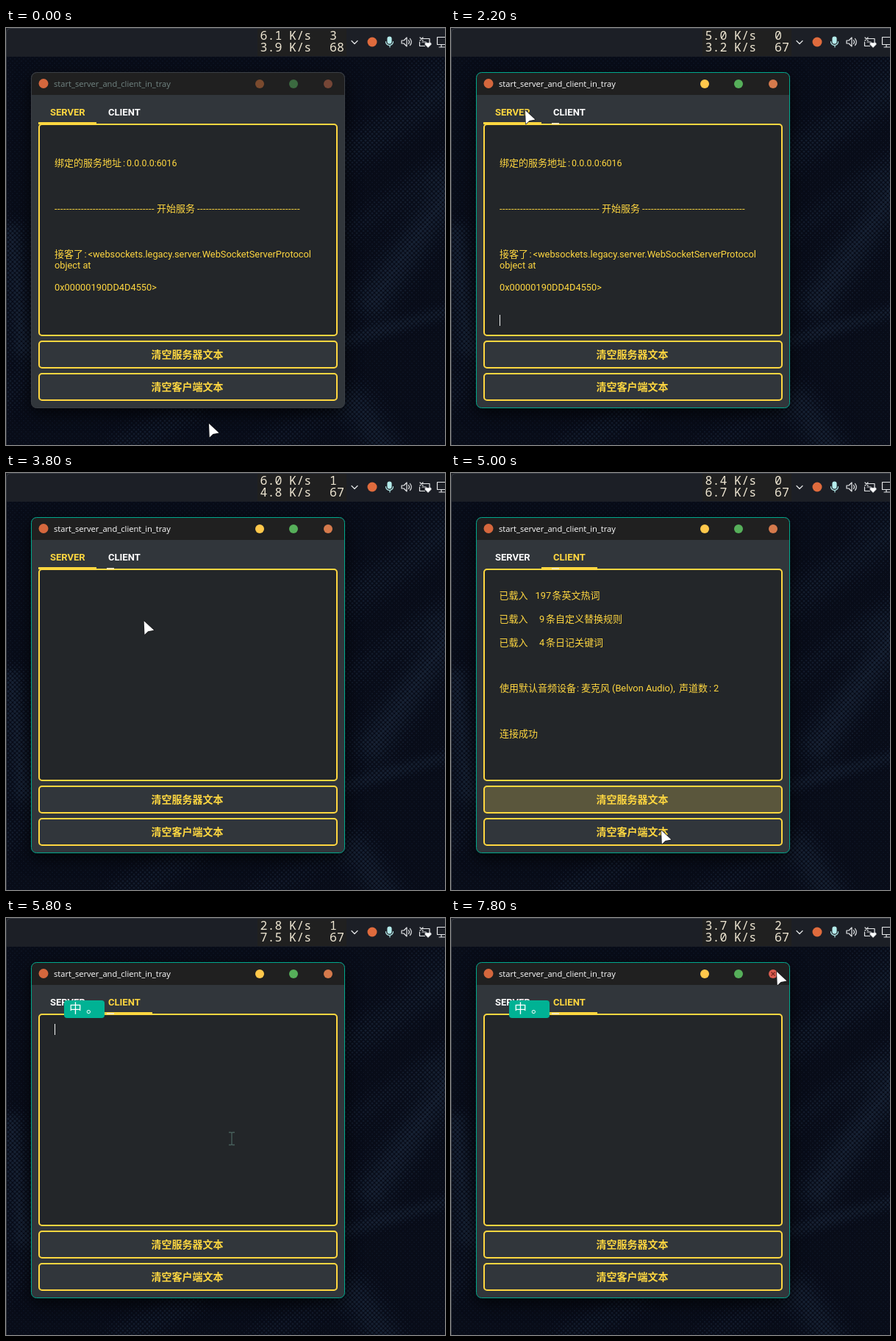
Write an HTML page with a canvas that moves like this. It is 597 px wide and 567 px high and loops after 8 s.

```html
<!DOCTYPE html>
<html lang="zh">
<head>
<meta charset="utf-8">
<style>
  html, body { margin: 0; width: 100%; height: 100%; overflow: hidden; background: #080c18; }
  canvas, svg { position: absolute; left: 0; top: 0; }
  text { white-space: pre; }
  .mono { font: 16.6px "Noto Sans Mono", monospace; fill: #eee6d2; }
  .title { font: 11.15px "Open Sans", sans-serif; }
  .tab { font: bold 13px Roboto, sans-serif; }
  .log text { font: 12.8px Roboto, "Noto Sans CJK SC", sans-serif; fill: #ffd740; }
  .log .cjk { font-size: 13px; }
  .log .digits { font-size: 12.4px; }
  .log .rule { font-size: 13px; letter-spacing: .41px; }
  .button text { font: bold 14px "Noto Sans CJK SC", sans-serif; fill: #ffd740; }
  .button rect, .panel { stroke: #ffd740; stroke-width: 2; }
  .ime { font: 17px "Noto Sans CJK SC", sans-serif; fill: #fff; }
  .icon { fill: none; stroke: #e4e6e8; stroke-width: 1.2; stroke-linejoin: round; stroke-linecap: round; }
  #shadow { filter: drop-shadow(0 7px 11px rgba(0, 0, 0, .75)); }
</style>
</head>
<body>
<canvas id="wall" width="597" height="567"></canvas>
<svg width="597" height="567" viewBox="0 0 597 567">
  <!-- taskbar -->
  <rect width="597" height="39" fill="#1c1f26"/>
  <rect x="342" y="1" width="121" height="37" fill="#202020"/>
  <path d="M.5 567V7Q.5 .5 7 .5H597" fill="none" stroke="#363a42"/>
  <g class="mono">
    <text id="up" x="345.5" y="16"/><text id="load" x="440" y="16"/>
    <text id="down" x="345.5" y="32"/><text id="heat" x="440" y="32"/>
  </g>
  <g class="icon">
    <path d="M470 17.5l4 4 4-4"/>
    <g stroke="#b5ecec">
      <rect x="519" y="12" width="5" height="9" rx="2.5" fill="#b5ecec"/>
      <path d="M516.5 18.5a5 5 0 0 0 10 0M522 23.500v2.500"/>
    </g>
    <path d="M538 17h3l4-4v12l-4-4h-3zM547.500 16.500q2 2.500 0 5M549.500 14.500q3.500 4.500 0 9"/>
    <path d="M566 14.500h10v5M562.500 19v5.500h7M563 13l4 4M567 13l-4 4M566 19h5"/>
    <path d="M574 26l-4-4q0-3 4-1 4-2 4 1z" fill="#fff"/>
    <path d="M599 12.500h-12.500v10h12.500M592 22.500v3.500M589 26h8"/>
  </g>
  <circle cx="498" cy="19" r="6.500" fill="#df6b3d"/>

  <!-- window -->
  <rect id="shadow" x="34.500" y="60.500" width="426" height="456" rx="7" fill="#31363b"/>
  <path d="M35 91V68a7 7 0 0 1 7-7h411a7 7 0 0 1 7 7v23z" fill="#202020"/>
  <rect id="frame" x="34.500" y="60.500" width="426" height="456" rx="7" fill="none"/>
  <circle cx="51" cy="75.500" r="6.500" fill="#d5673d"/>
  <text id="title" class="title" x="65" y="80">start_server_and_client_in_tray</text>
  <circle id="minimize" cx="345" cy="76" r="6"/>
  <circle id="maximize" cx="391" cy="76" r="6"/>
  <circle id="close" cx="438" cy="76" r="6"/>
  <path id="cross" d="M435.500 73.500l5 5m0-5l-5 5" stroke="#7b2922" stroke-width="1.300"/>

  <rect class="panel" x="45" y="131" width="405" height="287" rx="4" fill="#232629"/>
  <text id="serverTab" class="tab" x="60" y="119">SERVER</text>
  <text id="clientTab" class="tab" x="139" y="119">CLIENT</text>
  <rect id="underline" y="128" height="3" fill="#ffd740"/>
  <rect id="mark" x="137" y="129" width="10" height="2" fill="#f2e6b8"/>

  <g id="serverLog" class="log">
    <text class="cjk" x="66" y="188">绑定的服务地址</text>
    <text x="159" y="188">:</text><text class="digits" x="164" y="188">0.0.0.0:6016</text>
    <text id="ruleLeft" class="rule" x="66" y="250"/>
    <text class="cjk" x="205" y="250">开始服务</text>
    <text id="ruleRight" class="rule" x="260" y="250"/>
    <text class="cjk" x="66" y="312">接客了</text><text x="106.500" y="312">:</text>
    <text x="111.500" y="312">&lt;websockets.legacy.server.WebSocketServerProtocol</text>
    <text x="66" y="327">object at</text>
    <text x="66" y="357">0x00000190DD4D4550&gt;</text>
  </g>
  <g id="clientLog" class="log">
    <text class="cjk" x="65.500" y="171">已载入</text><text x="114.500" y="171">197</text>
    <text class="cjk" x="137.500" y="171">条英文热词</text>
    <text class="cjk" x="65.500" y="203">已载入</text><text x="120" y="203">9</text>
    <text class="cjk" x="129" y="203">条自定义替换规则</text>
    <text class="cjk" x="65.500" y="235">已载入</text><text x="120" y="235">4</text>
    <text class="cjk" x="129" y="235">条日记关键词</text>
    <text class="cjk" x="66" y="297">使用默认音频设备</text><text x="171" y="297">:</text>
    <text class="cjk" x="177" y="297">麦克风</text>
    <text x="219" y="297">(Belvon Audio),</text>
    <text class="cjk" x="310" y="297">声道数</text><text x="351" y="297">:</text><text x="357" y="297">2</text>
    <text class="cjk" x="66" y="359">连接成功</text>
  </g>
  <rect id="caret" x="66" width="1" height="15" fill="#f4f4f4"/>

  <g class="button">
    <rect id="clearServer" x="45" y="426" width="405" height="36" rx="4"/>
    <text x="197.500" y="449">清空服务器文本</text>
    <rect id="clearClient" x="45" y="470" width="405" height="36" rx="4"/>
    <text x="197.500" y="493">清空客户端文本</text>
  </g>
  <g id="ime">
    <rect x="79" y="112" width="55" height="24" rx="4" fill="#00b294"/>
    <text class="ime" x="86" y="129">中</text><text class="ime" x="109" y="129">。</text>
  </g>
  <path id="arrow" d="M0 0L.8 18.500 5.500 14 13.500 12.500z" fill="#fff" stroke="#17181a" stroke-width="1.400" stroke-linejoin="round" paint-order="stroke"/>
  <path id="beam" d="M-4-8.500h3l1 1 1-1h3M0-7.500v15M-4 8.500h3l1-1 1 1h3" fill="none" stroke="#48615d" stroke-width="1.300"/>
</svg>
<script>
const $ = id => document.getElementById(id);
const set = (id, attrs) => Object.entries(attrs).forEach(([k, v]) => $(id).setAttribute(k, v));
const show = (id, on) => set(id, { visibility: on ? 'visible' : 'hidden' });
const between = (t, from, to) => t >= from && t < to;

// Halftone wallpaper: soft bands control the dot size. Band: x1, y1, x2, y2, width, strength
const BANDS = [
  [460, 175, 600, 85, 28, .55], [500, 370, 600, 225, 30, .8], [470, 275, 600, 180, 20, .4],
  [465, 425, 600, 385, 12, .65], [8, 280, 22, 430, 20, .8], [0, 500, 90, 400, 25, .4],
  [160, 570, 250, 520, 24, .5], [350, 570, 440, 520, 24, .4], [475, 510, 515, 570, 28, .75],
  [560, 60, 600, 40, 30, .3]
];

function glow(x, y) {
  let sum = .18;
  for (const [x1, y1, x2, y2, width, strength] of BANDS) {
    const dx = x2 - x1, dy = y2 - y1;
    const p = Math.max(0, Math.min(1, ((x - x1) * dx + (y - y1) * dy) / (dx * dx + dy * dy)));
    const d = Math.hypot(x - x1 - p * dx, y - y1 - p * dy) / width;
    sum += strength * Math.exp(-d * d);
  }
  return Math.min(1, sum);
}

function paintWall() {
  const ctx = $('wall').getContext('2d');
  ctx.fillStyle = '#080c18';
  ctx.fillRect(0, 0, 597, 567);
  for (let row = 0; row < 190; row++) {
    for (let x = row % 2 * 3; x < 600; x += 6) {
      const g = glow(x, row * 3);
      ctx.fillStyle = `rgb(${12 + 12 * g}, ${17 + 18 * g}, ${31 + 22 * g})`;
      ctx.beginPath();
      ctx.arc(x, row * 3, .8 + 1.1 * g, 0, 7);
      ctx.fill();
    }
  }
}

// Pointer moves: start, end, x, y
const MOVES = [
  [0, 1000, 154, 108], [1200, 2100, 101, 112], [2400, 3000, 281, 439], [3400, 4000, 155, 118],
  [4100, 4650, 284, 458], [4600, 5000, 286, 486], [5100, 5650, 307, 300],
  [5800, 6900, 511, 12], [7200, 7800, 443, 73]
];

function pointer(t) {
  let x = 276, y = 538;
  for (const [start, end, toX, toY] of MOVES) {
    const p = Math.max(0, Math.min(1, (t - start) / (end - start)));
    const ease = p * p * (3 - 2 * p);
    x += (toX - x) * ease;
    y += (toY - y) * ease;
  }
  return [x, y];
}

// Monitor: time, upload, download, load, temperature
const READINGS = [
  [0, '6.1', '3.9', 3, 68], [1000, '6.2', '6.1', 2, 67], [2000, '5.0', '3.2', 0, 67],
  [3000, '6.0', '4.8', 1, 67], [4000, '5.3', '4.1', 1, 67], [4800, '8.4', '6.7', 0, 67],
  [5800, '2.8', '7.5', 1, 67], [6800, '4.2', '3.6', 1, 67], [7600, '3.7', '3.0', 2, 67]
];

function render(time) {
  // The screen refreshes five times a second, faster around the first clear.
  const step = between(time, 2200, 2600) ? 100 : 200;
  const t = Math.floor(time / step) * step;

  const [, up, down, load, heat] = READINGS.findLast(r => r[0] <= t);
  $('up').textContent = up + ' K/s';
  $('down').textContent = down + ' K/s';
  $('load').textContent = load;
  $('heat').textContent = heat;

  const active = t >= 800;
  set('frame', { stroke: active ? '#00a88c' : '#3c4045' });
  set('title', { fill: active ? '#fff' : '#718482' });
  set('minimize', { fill: active ? '#ffc84b' : '#7a4a2e' });
  set('maximize', { fill: active ? '#56af5a' : '#3b6a40' });
  const closing = t >= 7800;
  set('close', { fill: closing ? '#dc5d50' : active ? '#d57a4c' : '#754636' });
  show('cross', closing);

  const client = between(t, 1000, 2000) || t >= 4000;
  set('serverTab', { fill: client ? '#fff' : '#ffd740' });
  set('clientTab', { fill: client ? '#ffd740' : '#fff' });
  set('underline', client ? { x: 123, width: 76 } : { x: 44, width: 79 });
  show('mark', t >= 1000);
  show('serverLog', !client && t < 3000);
  show('clientLog', client && t < 5200);

  const hover = on => ({ fill: on ? '#5a563c' : '#31363b' });
  set('clearServer', hover(between(t, 2800, 3600) || between(t, 4600, 5200)));
  set('clearClient', hover(between(t, 5200, 5400)));

  const typing = t >= 5800;
  const blink = Math.floor((t - 5700) / 530) % 2 === 0;
  show('caret', between(t, 1000, 1600) || between(t, 2000, 2500) || typing && blink);
  set('caret', { y: typing ? 144 : client ? 394 : 390 });
  show('ime', typing);

  const [x, y] = pointer(t);
  const overText = between(t, 5400, 6400) && between(y, 133, 417);
  show('arrow', !overText);
  show('beam', overText);
  const place = { transform: `translate(${x} ${y})` };
  set('arrow', place);
  set('beam', place);
}

function loop() {
  render(performance.now() % 8000);
  requestAnimationFrame(loop);
}

$('ruleLeft').textContent = '-'.repeat(34);
$('ruleRight').textContent = '-'.repeat(35);
paintWall();
loop();
</script>
</body>
</html>
```
